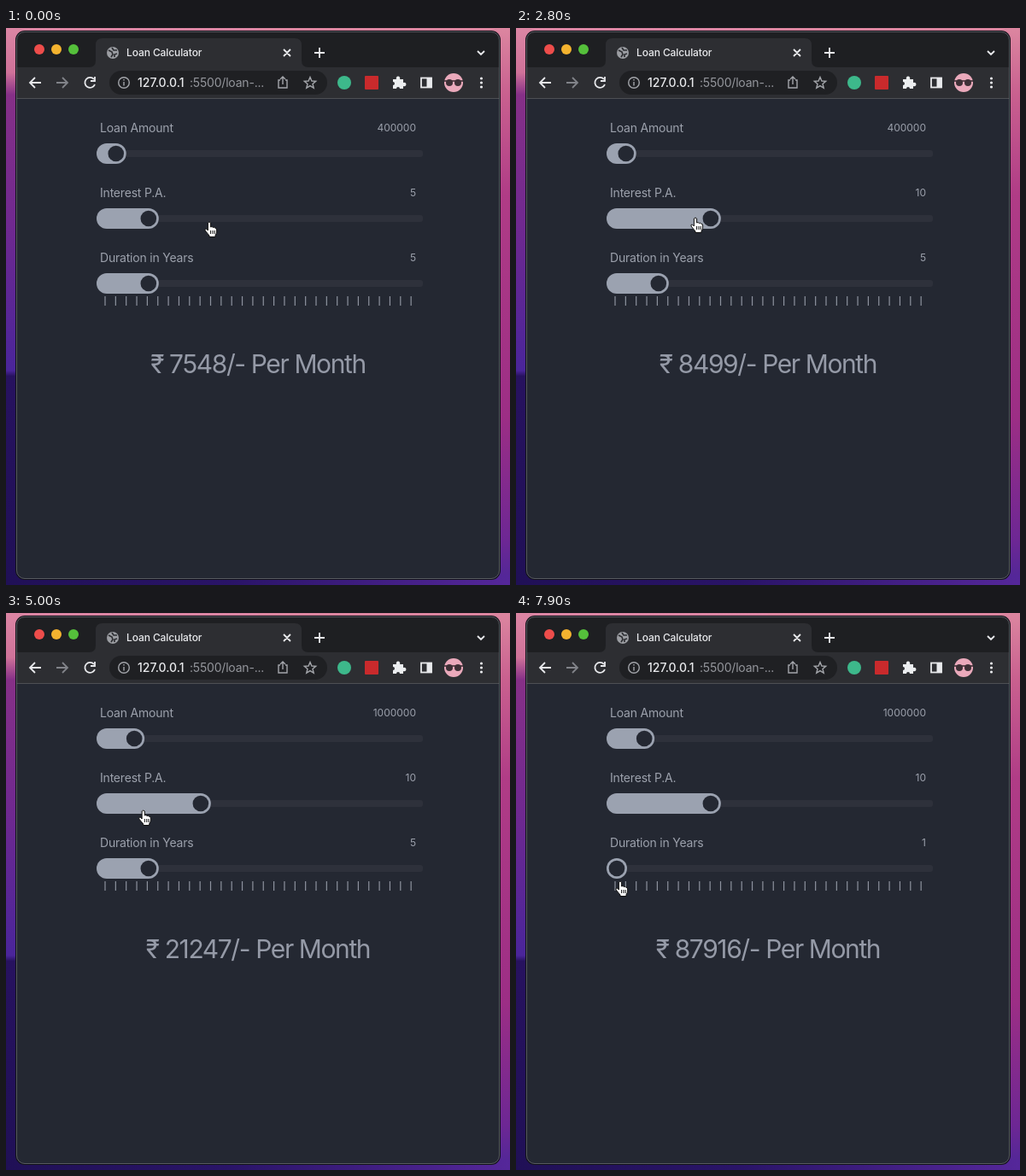
Recreate the animation shown at these times as an HTML page. Size 590 px wide and 652 px high, loop 8 s.

```html
<!DOCTYPE html>
<html lang="en">
<head>
<meta charset="utf-8">
<title>Loan Calculator</title>
<style>
html, body { margin: 0; width: 100%; height: 100%; overflow: hidden; background: #241258; }
svg { display: block; width: 590px; height: 652px; font-family: Inter, "Noto Sans", sans-serif; }
.label { font-size: 14px; letter-spacing: -.2px; fill: #9ca1ac; }
.value { font-size: 12px; text-anchor: end; fill: #9ca1ac; }
#result { font-size: 30px; letter-spacing: -1.4px; text-anchor: middle; fill: #959aa7; }
.icon { fill: none; stroke: #e8e9ec; stroke-width: 1.8; }
.dim { stroke: #a3a5aa; stroke-width: 1.4; }
</style>
</head>
<body>
<svg viewBox="0 0 590 652">
  <defs>
    <linearGradient id="left" x2="0" y2="1">
      <stop offset="0" stop-color="#dc86a4"/><stop offset=".08" stop-color="#cf7299"/>
      <stop offset=".12" stop-color="#863087"/><stop offset=".35" stop-color="#70298f"/>
      <stop offset=".615" stop-color="#4a259a"/><stop offset=".625" stop-color="#27125f"/>
      <stop offset="1" stop-color="#201056"/>
    </linearGradient>
    <linearGradient id="right" x2="0" y2="1">
      <stop offset="0" stop-color="#dc86a0"/><stop offset=".12" stop-color="#c9608f"/>
      <stop offset=".3" stop-color="#b03c86"/><stop offset=".7" stop-color="#9c2e85"/>
      <stop offset=".92" stop-color="#6d2794"/><stop offset="1" stop-color="#4d2798"/>
    </linearGradient>
    <linearGradient id="bottom">
      <stop offset="0" stop-color="#201056"/><stop offset=".45" stop-color="#2a1468"/>
      <stop offset="1" stop-color="#55279a"/>
    </linearGradient>
    <clipPath id="frame"><rect x="12" y="4" width="566" height="641" rx="10"/></clipPath>
  </defs>

  <rect width="300" height="652" fill="url(#left)"/>
  <rect x="295" width="295" height="652" fill="url(#right)"/>
  <rect y="640" width="590" height="12" fill="url(#bottom)"/>
  <rect x="11" y="3" width="568" height="643" rx="11" fill="#111218"/>

  <g clip-path="url(#frame)">
    <rect x="12" y="4" width="566" height="641" fill="#242832"/>
    <rect x="12" y="4" width="566" height="42" fill="#1e1f22"/>
    <path d="M97 46q8 0 8-8V20q0-8 8-8H338q8 0 8 8v18q0 8 8 8z" fill="#2d2e32"/>
    <rect x="12" y="46" width="566" height="36" fill="#2d2e32"/>
    <rect x="12" y="82" width="566" height="1" fill="#4d4f54"/>
  </g>
  <rect x="12.5" y="4.5" width="565" height="640" rx="9.5" fill="none" stroke="#64666d" stroke-opacity=".8"/>

  <circle cx="39" cy="25" r="6" fill="#ee4d4b"/>
  <circle cx="59" cy="25" r="6" fill="#f4b32f"/>
  <circle cx="79" cy="25" r="6" fill="#55c03b"/>
  <circle cx="125" cy="29" r="7" fill="#9b9da2"/>
  <path d="M120 26l4 2 1 3-2 3M124 23l2 3 4 0M127 34l0-3 3-1" fill="none" stroke="#2d2e32" stroke-width="1.7"/>
  <text x="141" y="33" font-size="12" font-weight="500" letter-spacing="-.1" fill="#e8e9ec">Loan Calculator</text>
  <path class="icon" d="M325 25l8 8m0-8l-8 8M361 29h12m-6-6v12M552 27l4 4 4-4"/>

  <path class="icon" d="M41 64H28m6-6l-6 6 6 6M103 60a6 6 0 1 0 1 6M104 57v5h-5"/>
  <path class="icon" d="M59 64h13m-6-6l6 6-6 6" style="stroke:#818389"/>
  <rect x="121" y="50" width="255" height="28" rx="14" fill="#1f2023"/>
  <circle class="icon dim" cx="138" cy="64" r="6.3"/>
  <path class="icon dim" d="M138 63v4.5M138 60v1.5M321 61h-2v9h10v-9h-2M324 66v-9m-3 3l3-3 3 3"/>
  <path class="icon dim" d="M356 57.5l1.9 4.5 4.8.4-3.7 3.1 1.2 4.7-4.2-2.6-4.2 2.6 1.2-4.7-3.7-3.1 4.8-.4z"/>
  <text x="154" y="69" font-size="14" font-weight="500" fill="#e8e9ec">127.0.0.1</text>
  <text x="215" y="69" font-size="14" letter-spacing="-.2" fill="#94969c">:5500/loan-...</text>

  <circle cx="396" cy="64" r="8" fill="#3db88b"/>
  <rect x="420" y="56" width="16" height="16" rx="1" fill="#c92a2c"/>
  <path d="M453 60h4a2.3 2.3 0 1 1 4 0h4v4a2.3 2.3 0 1 1 0 4v3h-4a2 2 0 1 0-4 0h-4v-4a2 2 0 1 0 0-4z" fill="#eceef0"/>
  <rect class="icon" x="486" y="58.500" width="12" height="11"/>
  <rect x="492.500" y="58" width="6" height="12" fill="#e8e9ec"/>
  <circle cx="524" cy="64" r="11" fill="#eaa9bb"/>
  <path d="M513 62h22" stroke="#35272d" stroke-width="1.5"/>
  <circle cx="519" cy="64" r="4" fill="#3e3036"/><circle cx="529" cy="64" r="4" fill="#3e3036"/>
  <g fill="#e8e9ec"><circle cx="556.500" cy="59" r="1.6"/><circle cx="556.500" cy="64" r="1.6"/><circle cx="556.500" cy="69" r="1.6"/></g>

  <g id="sliders"></g>
  <path id="ticks" stroke="#8d929e" stroke-width="1.2"/>
  <text id="result" x="295" y="404"></text>
  <path id="hand" fill="#fff" stroke="#111" stroke-width="1" stroke-linejoin="round"
    d="M-1.600 1Q0-1 1.600 1V6Q3.300 4.800 4.300 6.500 6 5.500 6.800 7.300 8.500 6.800 8.600 9V12Q8.300 14 7 15.500V17.500H0V16Q-2 13.500-5 10-5.500 7.500-3.300 8.200L-1.600 10ZM1.600 10v4M4 10v4M6.200 10v4"/>
</svg>
<script>
const LOOP = 8000, STEP = 100, START = 118, SPAN = 354;
const $ = id => document.getElementById(id);

const sliders = [
  { name: "Loan Amount", y: 147, initial: 4, max: 100, unit: 100000 },
  { name: "Interest P.A.", y: 223, initial: 5, max: 30, unit: 1 },
  { name: "Duration in Years", y: 299, initial: 5, max: 30, unit: 1 }
];

// Pointer path: time, x, y
const path = [
  [0, 238, 227], [200, 238, 227], [800, 168, 221], [1000, 168, 222],
  [1600, 204, 225], [2100, 229, 226], [2400, 229, 226], [2800, 210, 222],
  [3400, 129, 145], [3600, 129, 145], [4100, 151, 146], [4400, 152, 147],
  [5500, 168, 301], [6000, 171, 304], [6200, 171, 305], [7000, 143, 309],
  [7700, 122, 314], [8000, 122, 314]
];

// Drags: slider index, start, end
const drags = [[1, 900, 2200], [0, 3500, 4200], [2, 5900, 8000]];

$("sliders").innerHTML = sliders.map(s => `
  <text class="label" x="110" y="${s.y - 25}">${s.name}</text>
  <text class="value" x="480" y="${s.y - 26}"></text>
  <rect x="106" y="${s.y - 4}" width="382" height="8" rx="3" fill="#2e313b"/>
  <rect class="fill" x="106" y="${s.y - 12}" height="24" rx="12" fill="#9ba2b0"/>
  <circle class="thumb" cy="${s.y}" r="9.300" fill="#242832"/>`).join("");
const values = document.querySelectorAll(".value");
const fills = document.querySelectorAll(".fill");
const thumbs = document.querySelectorAll(".thumb");
$("ticks").setAttribute("d", Array.from({ length: 30 }, (_, i) => `M${116 + i * 12.35} 314v11`).join(""));

function pointer(t) {
  const i = path.findIndex(p => p[0] > t);
  const [t0, x0, y0] = path[i - 1], [t1, x1, y1] = path[i];
  const k = (t - t0) / (t1 - t0);
  return [x0 + (x1 - x0) * k, y0 + (y1 - y0) * k];
}

function valueAt(index, t) {
  const s = sliders[index];
  const [, from, to] = drags.find(d => d[0] === index);
  if (t < from) return s.initial;
  const x = pointer(Math.min(t, to))[0];
  const v = Math.round(1 + (x - START) / SPAN * (s.max - 1));
  return Math.max(1, Math.min(s.max, v));
}

function payment(amount, rate, years) {
  const r = rate / 1200, growth = (1 + r) ** (years * 12);
  return Math.round(amount * r * growth / (growth - 1));
}

function draw(now) {
  const t = Math.floor(now % LOOP / STEP) * STEP;
  const amounts = sliders.map((s, i) => {
    const v = valueAt(i, t);
    const x = START + (v - 1) / (s.max - 1) * SPAN;
    values[i].textContent = v * s.unit;
    fills[i].setAttribute("width", x - 94);
    thumbs[i].setAttribute("cx", x);
    return v * s.unit;
  });
  $("result").textContent = `₹ ${payment(...amounts)}/- Per Month`;
  $("hand").setAttribute("transform", `translate(${pointer(t)})`);
  requestAnimationFrame(draw);
}
requestAnimationFrame(draw);
</script>
</body>
</html>
```
